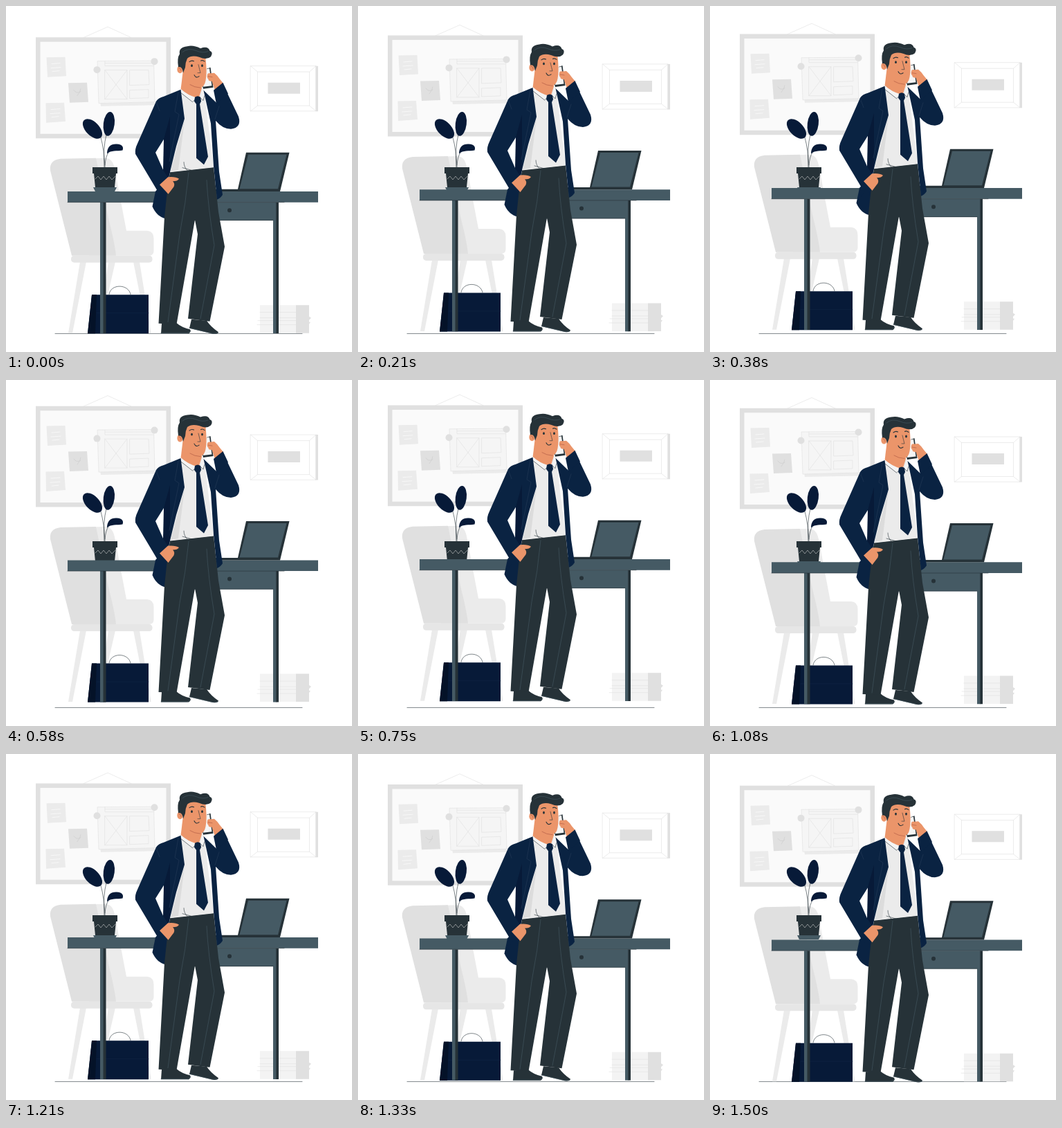
These frames come from a looping animation (500 by 500 pixels, 1.54 s). An HTML page:

```html
<!DOCTYPE html>
<html lang="en">
<head>
<meta charset="utf-8">
<title>Office call</title>
<style>
html, body { margin: 0; width: 100%; height: 100%; overflow: hidden; background: #fff; }
svg { display: block; width: 100vw; height: 100vh; }
.line { fill: none; stroke-width: .6; stroke-linecap: round; stroke-linejoin: round; }
.bold { stroke-width: 1.1; }
.pale { stroke: #e0e0e0; }
.ink { stroke: #263238; }
.slate { stroke: #455a64; }
.seam { stroke: #263c58; }
.blush { stroke: #a95540; }
.navy { fill: #0a2342; }
.deep { fill: #071a38; }
.dark { fill: #263238; }
.steel { fill: #455a64; }
.grey { fill: #e0e0e0; }
.light { fill: #ebebeb; }
.skin { fill: #eb956a; }
</style>
</head>
<body>
<svg viewBox="0 0 500 500">
  <path class="line ink" d="M71 473.400H428"/>

  <g class="float">
    <g id="board">
      <path class="line pale" d="M112 46L147 30.500L181 46"/>
      <path class="grey" d="M43 45.700H238V191.500H43Z"/>
      <path fill="#fafafa" d="M49.500 52.200H231.500V185H49.500Z"/>
      <path class="light" d="M58.500 74.500L85.500 74L87 101.500L60 103ZM57.500 140.500L84 140L86 167L58 169Z"/>
      <path class="grey" d="M90 111.500L117 111L119 139L92 140Z"/>
      <path class="line" stroke="#fff" d="M66 84l12-1M65 90l14-1M67 95l10-1M65 150l13-1M64 156l14-1M66 161l10-1"/>
      <path class="line" stroke="#ccc" d="M98 122q4 6 10 2M103 130q5-6 5-10"/>
      <path class="light" d="M136 139L215 136L215.500 143.500L137 145Z"/>
      <path fill="#f5f5f5" stroke="#e0e0e0" stroke-width=".6" d="M132 80L213.500 79.500L215 139L134 141Z"/>
      <path class="line pale" d="M143 80V87H213M143 83H212M143 93H175V135H143ZL175 135M175 93L143 135M179 93H206L207 114L179 115ZM179 122L206 121V133L179 134Z"/>
      <circle class="grey" cx="131.500" cy="92.500" r="5"/>
      <circle class="grey" cx="214.500" cy="80.500" r="5"/>
    </g>

    <g id="frame">
      <path class="line pale" d="M353.500 87H448V152.200H353.500ZL363.500 95.500H438.500V144.500H363.500V95.500M448 87L438.500 95.500M448 152.200L438.500 144.500M353.500 152.200L363.500 144.500"/>
      <path class="grey" d="M447.500 87H451V152.500H447.500ZM378.500 111H425V127H378.500Z"/>
    </g>

    <g id="chair">
      <path class="light" d="M107 370H116L96 473H90ZM148 370H158L142 440H137ZM184 370H193L209.500 473H204.500Z"/>
      <path class="light" d="M125 220.500L143 220Q154 220 157 235L174 325H204Q213.500 326 213.500 336V355Q213 361 206 361H120Z"/>
      <path class="grey" d="M64 238Q62 223 79 221L130 220L148 307Q157 342 159 361H95Z"/>
      <rect x="94" y="361" width="117.500" height="10" rx="4.500" fill="#e6e6e6"/>
    </g>

    <g id="papers">
      <path fill="#f3f3f3" d="M367 432.500H419V473H367Z"/>
      <path class="grey" d="M419 432.500H438V449L441 451L438 454V457H440L438 460V473H419Z"/>
      <path class="line pale" d="M367 443H419M364 455H419M363 461H419M367 451H419"/>
    </g>

    <g id="bag">
      <path class="line ink" d="M149 417C151 401.500 177 401.500 180 417"/>
      <path class="deep" d="M124 417.500H206V473.500H118Z"/>
      <path fill="#041228" d="M124 417.500H131L129 473.500H118Z"/>
      <path class="line" stroke="#122645" d="M131 444H206"/>
    </g>
  </g>

  <g id="plant">
    <path class="line ink" d="M137 190Q142 208 143 233M145 186Q140 205 142 233M148 212Q144 217 143 230"/>
    <g class="deep">
      <ellipse rx="17.500" ry="9.800" transform="translate(125 177.500) rotate(46)"/>
      <ellipse rx="8" ry="17.500" transform="translate(148.800 170.300) rotate(7)"/>
      <path d="M146 213.500C146 203 152 199 160 199.500C169 199.500 170 205 168.500 208.500C160 210 152 208 146 213.500Z"/>
    </g>
    <path class="dark" d="M125 233H161V242H159L157 262H129L127 242H125Z"/>
    <path class="line" stroke="#ccc" d="M129 250l4-4 4 5 4-5 4 5 4-5 4 5 5-5"/>
    <path class="steel" d="M126 262H160L157 268H129Z"/>
  </g>

  <g class="float">
    <g id="desk">
      <path class="steel" d="M270 284H387V310.300H270ZM136 284H141V473.300H136ZM386 284H391V473.300H386Z"/>
      <path class="dark" d="M140.500 284H144.500V473.300H140.500ZM390.300 284H394V473.300H390.300Z"/>
      <path class="steel" d="M89 268.300H451V284H89Z"/>
      <path class="line ink" d="M89 284H402M270 310H386"/>
      <circle class="dark" cx="323" cy="295.500" r="3"/>
      <path class="dark" d="M302 265H335L347 212H409.500L396 268.300H302Z"/>
      <path class="steel" d="M350 215H405.500L393 264.500H337.500Z"/>
    </g>

    <g id="man">
      <path class="dark" d="M225 459L246 458Q254 465 266 467.500Q268 471 264 473.500H224ZM268 453L290 455Q296 464 307 471.500Q306 475 299 474L265 466Z"/>
      <path class="line slate" d="M224 472.800H262L267 470M265 465.500L298 473.500L306 473"/>
      <path class="navy" d="M216 268L211.500 290Q218 305 231 307.500L243 240Z"/>
      <path class="dark" d="M237 240L300 233L304 270L307 298L316 348L294.500 456L263 452L277 330L273 309L246.500 460L220.500 459L229 305L234 258Z"/>
      <path class="line slate" d="M264 241Q260 285 251 330L234 457M290 252Q292 292 301 346L281 452"/>

      <path class="light" d="M252 121L286 120L300 233.500L237 240.500Z"/>
      <path fill="#dcdcdc" d="M258 165L238 239L249 237Z"/>
      <path class="line ink" d="M257 226Q257 233 262 238M255 234L269 238"/>

      <path class="skin" d="M256 92L252.500 121Q263 131 278 135L283 119L282 108Z"/>
      <path fill="#f4f4f4" d="M252.500 120Q262 129 276 133L270 139L253 126ZM281 132L284 119L288 130L284 136Z"/>
      <path class="line ink" d="M253 126L269.500 139L275 134M281 133L285 137L287 130"/>
      <path class="navy" d="M273 132Q277 129 281 132L282 138L280 142L292 218L286 229.500L275 220L275 142L272 138Z"/>

      <path class="navy" d="M252.500 121L258 163L246 203L237 240L234 255L216 285L218 266L187 214Q186 207 190 199L217 138Q220 133 228 131ZM285.500 122L304 140Q304 122 313 112L336 160Q341 176 325 178Q313 178 303 166L308 240L313 273Q310 278 305 280L300 232L296 170Z"/>
      <path class="deep" d="M237 160L228 193L227 237L234 248L237 240Z"/>
      <path fill="#fff" d="M228 193L216 212L227 237Z"/>
      <path class="line seam" d="M249 125L244 153L250 157L236 225M217 139L222 152M302 164L308 145"/>

      <path class="skin" d="M222 258.500L234 247.500Q245 246.500 250 250Q248 253.500 241 253.500Q244.500 257 242.500 261.500L234.500 272Z"/>

      <path class="dark" d="M290 91L295.500 89L299.500 118L285 120L284 116Z"/>
      <path fill="#f5f5f5" d="M287 92L294 90.500L297.500 115.500L285 117Z"/>

      <path class="skin" d="M258 72H288Q291 96 288.500 108Q287 118 278 119Q265 118 257 108Z"/>
      <ellipse class="skin" cx="251.500" cy="92" rx="4.200" ry="5.500"/>
      <path class="line blush" d="M250 90q3 0 3 4M266 114Q272 118 281 118.500"/>
      <path class="dark" d="M249 88.500Q247 75 251 69.500Q249 60 262 58.500Q271 56.500 281 61.500Q292 57.500 294.500 65Q300 67 296 73.500Q290 79 279 74Q268 71 262 76Q259 82 259 89L256 97Q255 87 249 88.500Z"/>
      <path class="line slate" d="M255 67Q263 60 275 65Q284 69 292 66"/>
      <path class="line bold ink" d="M265 81Q268 78.500 271.500 80M281.500 79.500Q284 78 287 80.500M272 100Q274.500 105.500 279 102"/>
      <path class="line ink" d="M278 85Q280 93 281 97L277 97"/>
      <ellipse class="dark" cx="268.500" cy="86.500" rx="1.400" ry="1.900"/>
      <ellipse class="dark" cx="283.500" cy="86.500" rx="1.400" ry="1.900"/>

      <path class="skin" d="M291 100Q291 96.500 296 97.500L301 97Q306 101 309 106L314 112L302 122L297.500 109Q292 109 292.500 106Q290 104 291 100Z"/>
      <path class="line blush" d="M292 102L298 103"/>
      <path class="navy" d="M300 122L313.500 111L321 127L304 142Z"/>
    </g>
  </g>
</svg>
<script>
const PERIOD = 1540, LIFT = 10, LEAD = 50, REST = 0.3;
const floaters = document.querySelectorAll('.float');

function draw(now) {
  const phase = ((now + LEAD) % PERIOD) / PERIOD;
  const y = REST - LIFT * (1 - Math.abs(1 - 2 * phase));
  for (const g of floaters) g.setAttribute('transform', `translate(0 ${y.toFixed(3)})`);
}

const start = performance.now();
function tick() {
  draw(performance.now() - start);
  requestAnimationFrame(tick);
}
tick();
</script>
</body>
</html>
```
